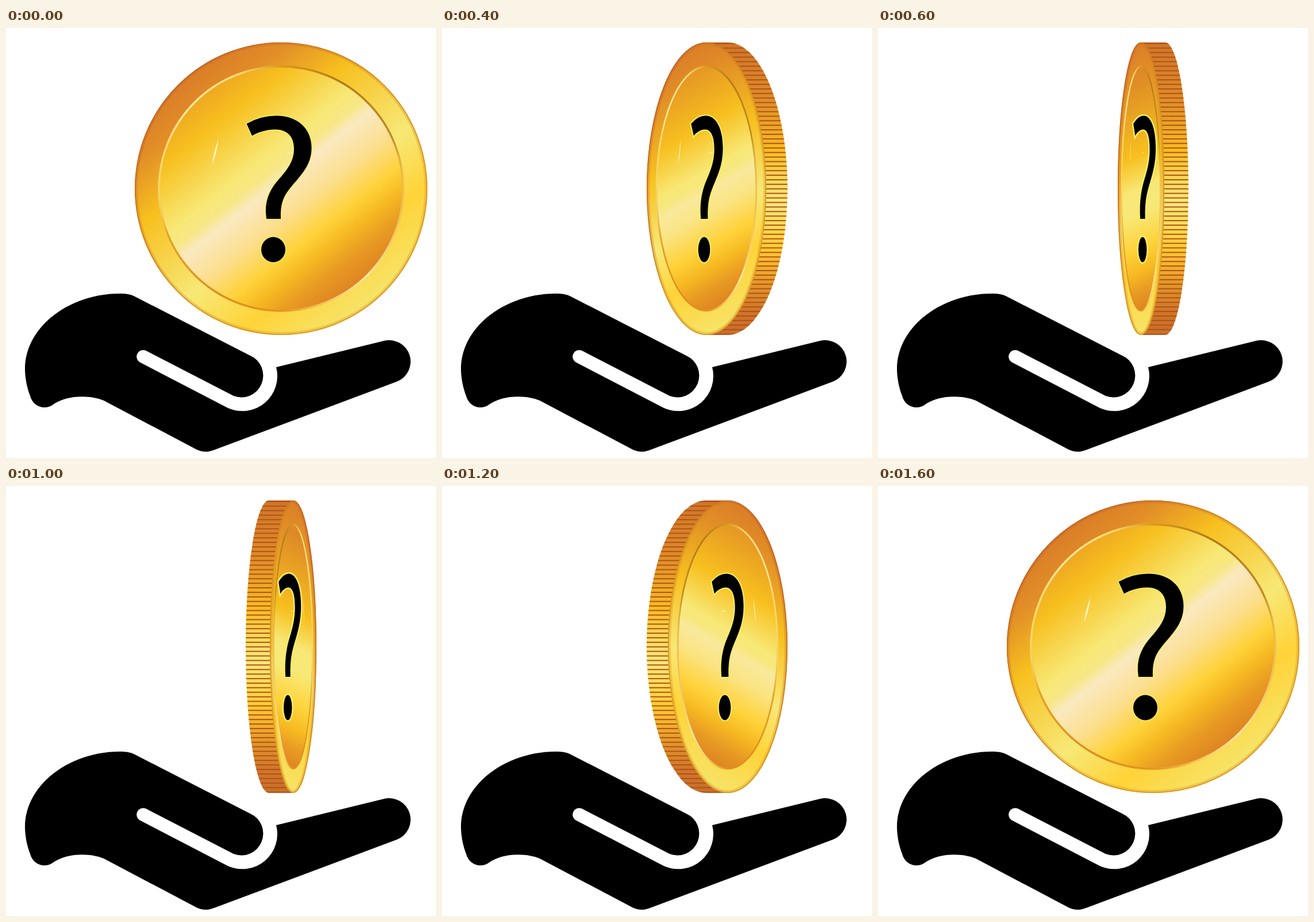
An HTML page for the animation above (1.8 s loop, 748x748 px).

```html
<!DOCTYPE html>
<html lang="en">
<head>
<meta charset="utf-8">
<title>Coin over a hand</title>
<style>
html, body { margin: 0; width: 100%; height: 100%; overflow: hidden; background: #fff; }
svg { display: block; width: 100%; height: 100%; }
</style>
</head>
<body>
<svg viewBox="0 0 748 748" xmlns="http://www.w3.org/2000/svg">
  <defs>
    <linearGradient id="rimFill" gradientUnits="userSpaceOnUse"></linearGradient>
    <linearGradient id="discFill" gradientUnits="userSpaceOnUse"></linearGradient>
    <linearGradient id="rimLine" x1="0" y1="0" x2="1" y2="1">
      <stop offset="0.1" stop-color="#c25c22"/>
      <stop offset="0.5" stop-color="#d8901f"/>
      <stop offset="1" stop-color="#dc9a22"/>
    </linearGradient>
    <linearGradient id="upperLine" gradientUnits="userSpaceOnUse">
      <stop offset="0" stop-color="#f6d468"/>
      <stop offset="0.12" stop-color="#fbe69c"/>
      <stop offset="0.32" stop-color="#f9dc74"/>
      <stop offset="0.5" stop-color="#d99a20"/>
      <stop offset="0.75" stop-color="#b07a18"/>
      <stop offset="0.95" stop-color="#c08a20"/>
      <stop offset="1" stop-color="#edc050"/>
    </linearGradient>
    <linearGradient id="lowerLine" gradientUnits="userSpaceOnUse">
      <stop offset="0" stop-color="#f6d468"/>
      <stop offset="0.04" stop-color="#e3a028"/>
      <stop offset="0.25" stop-color="#de8c1e"/>
      <stop offset="0.5" stop-color="#e2951f"/>
      <stop offset="0.66" stop-color="#f2c050"/>
      <stop offset="0.85" stop-color="#fae6a8"/>
      <stop offset="1" stop-color="#edc050"/>
    </linearGradient>
    <linearGradient id="edgeFill" gradientUnits="userSpaceOnUse" x1="0" y1="25" x2="0" y2="534">
      <stop offset="0" stop-color="#cf7628"/>
      <stop offset="0.18" stop-color="#dc8a26"/>
      <stop offset="0.37" stop-color="#f6be20"/>
      <stop offset="0.47" stop-color="#f5da58"/>
      <stop offset="0.55" stop-color="#f8ea7a"/>
      <stop offset="0.7" stop-color="#ffce32"/>
      <stop offset="0.82" stop-color="#e49a26"/>
      <stop offset="0.92" stop-color="#cf7628"/>
      <stop offset="1" stop-color="#c87028"/>
    </linearGradient>
    <pattern id="reeds" patternUnits="userSpaceOnUse" width="8" height="7.9" y="25">
      <rect y="1" width="8" height="2" fill="#b2501e"/>
    </pattern>
  </defs>

  <rect width="748" height="748" fill="#fff"/>
  <path d="M33 593C33 520 110 462 198 462C208 462 217 463 224 467L425 570A37.900 37.900 0 0 1 396 640L243 561
    A11.500 11.500 0 0 0 232 581L386 661A61 61 0 0 0 470 590L658.200 544A37.250 37.250 0 0 1 680.100 615L362 734
    C351 738.500 341 738 331 733L170 648C150 639 106 636 79 657C66 664 47 659 42 640C36 625 33 607 33 593Z"/>

  <g id="coin">
    <path id="edge" fill="url(#edgeFill)"/>
    <path id="ridges" fill="url(#reeds)"/>
    <g id="face">
      <ellipse id="rim" fill="url(#rimFill)"/>
      <ellipse id="rimSoft" fill="none" stroke="url(#rimLine)" stroke-width="5" opacity="0.35"/>
      <ellipse id="rimThin" fill="none" stroke="url(#rimLine)" stroke-width="1.800"/>
      <ellipse id="disc" fill="url(#discFill)"/>
      <path id="upper" fill="none" stroke="url(#upperLine)"/>
      <path id="lower" fill="none" stroke="url(#lowerLine)"/>
      <g id="glints" fill="#fdf3c4">
        <path d="M-109-86Q-112-60-120-42Q-118-62-109-86Z"/>
        <path d="M8-62L18-63L27-62L18-61Z"/>
        <path d="M-24 107L-30 106L-36 107L-30 108Z"/>
      </g>
    </g>
  </g>

  <g id="mark" stroke="#f6ee62" paint-order="stroke">
    <path vector-effect="non-scaling-stroke" d="M418.500 166Q443 152 470 152C508 152 531.500 175 531.500 208
      C531.500 236 516 252 500 271C484 290 477 301 478 331.500L453 331.500L452 321C451 298 459 280 476 261
      C492 243 501 229 501 210C501 188 489 176 468 176C454 176 440 180 428 187Z"/>
    <ellipse vector-effect="non-scaling-stroke" cx="465" cy="385" rx="21" ry="22"/>
  </g>
</svg>
<script>
const CX = 478.5, CY = 279.5, RX = 254.5, RY = 254.5, INNER = 212.5;
const STEP = 200, LOOP = 1800;
const $ = id => document.getElementById(id);

// half width, edge thickness, gradient angle, shade blend, mark x, mark scale, mirrored
const front = [RX, 0, 52, 0, 418, 1, false];
const poses = [
  front,
  [203.5, 22, 55, 0, 417, 0.71, false],
  [104, 37, 60, 0.5, 433, 0.49, false],
  [40.5, 42, 66, 1, 444, 0.345, false],
  [0, 43, 90, 1, 0, 0, false],
  [40.5, 42, 66, 1, 474, 0.345, true],
  [104, 37, 60, 0.5, 469, 0.49, true],
  [203.5, 22, 55, 0, 458.5, 0.71, true],
  front
];

// offset facing, offset nearly edge-on, colour
const rimStops = [
  [0, 0, '#da7d28'], [0.12, 0.1, '#e18d27'], [0.3, 0.42, '#f7c01f'],
  [0.6, 0.62, '#f7e877'], [0.8, 0.78, '#ffd338'], [1, 1, '#f6e46a']
];
const discStops = [
  [0, 0.04, '#eea822'], [0.13, 0.36, '#f7c01f'], [0.36, 0.5, '#f8e876'],
  [0.42, 0.53, '#f7e784'], [0.475, 0.55, '#fae9c0'], [0.6, 0.6, '#fcdf90'],
  [0.73, 0.74, '#ffd239'], [0.81, 0.84, '#f6b922'], [0.9, 0.92, '#e89a23'], [1, 1, '#de8423']
];

function set(id, attrs) {
  for (const k in attrs) $(id).setAttribute(k, attrs[k]);
}

function mix(a, b, k) {
  const ch = i => {
    const p = parseInt(a.substr(i, 2), 16), q = parseInt(b.substr(i, 2), 16);
    return Math.round(p + (q - p) * k);
  };
  return `rgb(${ch(1)},${ch(3)},${ch(5)})`;
}

// Run the gradient across the ellipse along the given angle.
function shade(id, stops, cx, rx, ry, deg, k) {
  const a = deg * Math.PI / 180, nx = Math.cos(a), ny = Math.sin(a);
  const len = Math.hypot(rx * nx, ry * ny);
  set(id, { x1: cx - nx * len, y1: CY - ny * len, x2: cx + nx * len, y2: CY + ny * len });
  $(id).innerHTML = stops.map(([p, q, c], i) => {
    let color = c;
    if (id === 'discFill') {
      if (i === 0) color = mix(c, '#de8a26', k);
      if (i > 2 && i < 6) color = mix(c, '#f7e877', k);
    }
    return `<stop offset="${p + (q - p) * k}" stop-color="${color}"/>`;
  }).join('');
}

function ellipse(id, cx, rx, ry) {
  set(id, { cx, cy: CY, rx: Math.max(rx, 0), ry });
}

function draw([rx, thick, deg, k, markX, markScale, mirrored]) {
  const cx = CX - thick / 2;
  const ix = rx * INNER / RX;
  set('coin', { transform: mirrored ? `translate(${2 * CX} 0) scale(-1 1)` : '' });

  const side = `M${cx} ${CY - RY}h${thick}A${rx} ${RY} 0 0 1 ${cx + thick} ${CY + RY}h${-thick}Z`;
  const show = thick ? 'inline' : 'none';
  set('edge', { d: side, display: show });
  set('ridges', { d: side, display: show });

  const seen = rx ? 'inline' : 'none';
  set('face', { display: seen });
  set('mark', { display: seen });
  if (!rx) return;

  ellipse('rim', cx, rx, RY);
  ellipse('rimSoft', cx, rx - 2.5, RY - 2.5);
  ellipse('rimThin', cx, rx - 0.9, RY - 0.9);
  ellipse('disc', cx, ix, INNER);
  shade('rimFill', rimStops, cx, rx, RY, deg, k);
  shade('discFill', discStops, cx, ix, INNER, deg, k);

  ['upper', 'lower'].forEach((id, i) => {
    set(id, {
      d: `M${cx - ix} ${CY}A${ix} ${INNER} 0 0 ${1 - i} ${cx + ix} ${CY}`,
      'stroke-width': 3.5 - 1.5 * k
    });
    set(id + 'Line', { x1: cx - ix, x2: cx + ix, y1: CY, y2: CY });
  });
  set('glints', { transform: `translate(${cx} ${CY}) scale(${rx / RX} 1)` });
  set('mark', {
    transform: `translate(${markX} 0.5) scale(${markScale} 1) translate(-418 0)`,
    'stroke-width': 3 + 2 * k
  });
}

let shown = -1;
const start = performance.now();
function tick() {
  const t = (performance.now() - start) % LOOP;
  const i = Math.floor(t / STEP);
  if (i !== shown) draw(poses[shown = i]);
  requestAnimationFrame(tick);
}
tick();
</script>
</body>
</html>
```
